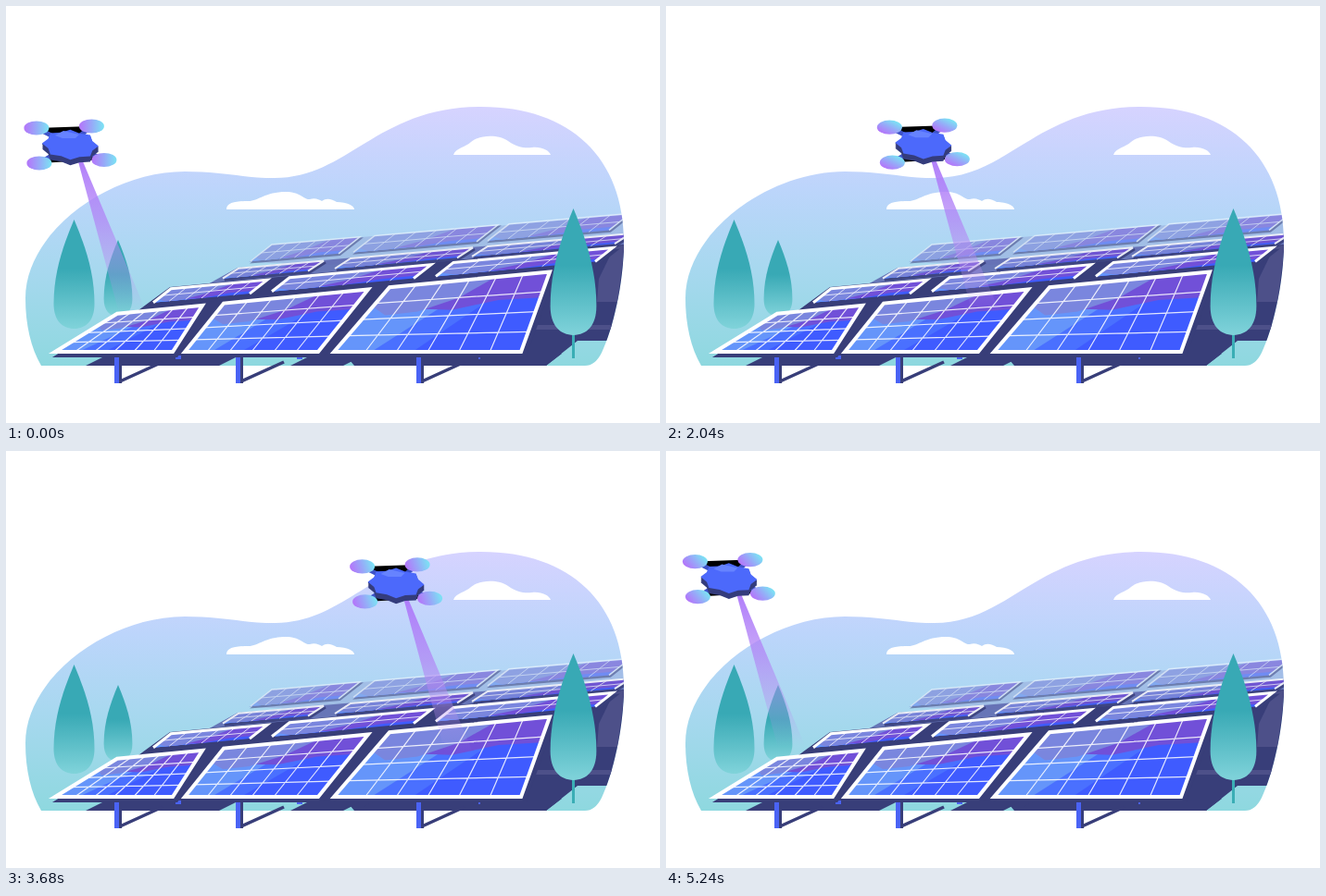
These frames come from a looping animation (706 by 451 pixels, 5.28 s). An HTML page:

```html
<!DOCTYPE html>
<html lang="en">
<head>
<meta charset="utf-8">
<title>Solar field survey</title>
<style>
html, body { margin: 0; width: 100%; height: 100%; overflow: hidden; background: #fff; }
svg { display: block; width: 706px; height: 451px; }
</style>
</head>
<body>
<svg viewBox="0 0 706 451">
  <defs>
    <linearGradient id="sky" x2="0" y2="1">
      <stop stop-color="#d6d3ff"/><stop offset=".32" stop-color="#bcd5fb"/>
      <stop offset=".6" stop-color="#a9d8f0"/><stop offset="1" stop-color="#8ed8df"/>
    </linearGradient>
    <linearGradient id="leaf" x2="0" y2="1">
      <stop offset=".45" stop-color="#38a9b5"/><stop offset="1" stop-color="#80d3da"/>
    </linearGradient>
    <linearGradient id="beam" x2="0" y2="1">
      <stop stop-color="#ad78fa" stop-opacity=".95"/><stop offset=".4" stop-color="#b183f5" stop-opacity=".7"/>
      <stop offset=".7" stop-color="#b58df0" stop-opacity=".4"/><stop offset="1" stop-color="#b79aee" stop-opacity="0"/>
    </linearGradient>
    <linearGradient id="spin">
      <stop offset=".05" stop-color="#b279fa"/><stop offset=".5" stop-color="#97a9f8"/><stop offset=".95" stop-color="#7ddff4"/>
    </linearGradient>
    <path id="blob" d="M38 389C27 370 21 345 21 316C21 245 110 179 193 179C235 179 255 186 290 186C370 186 400 109 513 109C610 109 667 165 667 255C667 300 655 350 643 375Q636 389 625 389Z"/>
    <clipPath id="inBlob"><use href="#blob"/></clipPath>
    <path id="crown" fill="url(#leaf)" d="M0 0C11 26 22 56 22 91C22 109 13 118 0 118C-13 118-22 109-22 91C-22 56-11 26 0 0Z"/>
  </defs>

  <use href="#blob" fill="url(#sky)"/>
  <g fill="#fff">
    <path d="M238 220C238 212 250 211 262 211C272 211 280 201 302 201C318 201 322 210 328 209C333 207 338 209 341 211C346 207 352 209 357 212C368 212 376 216 376 220Z"/>
    <path d="M483 161C486 153 496 153 502 147C512 139 532 139 542 146C552 153 560 154 568 153C578 152 586 156 588 161Z"/>
  </g>
  <use href="#crown" transform="translate(73.500 231)"/>
  <use href="#crown" transform="translate(121 253) scale(.7)"/>

  <g clip-path="url(#inBlob)">
    <path fill="#9aaede" opacity=".6" d="M262 277L287 258L672 226V250L350 280Z"/>
    <g id="row4" opacity=".5"></g>
    <path fill="#5c66ae" opacity=".85" d="M216 302L250 283L672 246V266L285 298Z"/>
    <g id="row3" opacity=".85"></g>
    <path fill="#383e79" d="M143 329L177 304L668 258L665 362H617L583 389H376L366 377H180Z"/>
    <path fill="#4d5089" d="M640 295L656 262L668 258L660 320H638ZM571 345H660L658 350H568Z"/>
    <g id="row2"></g>
    <path fill="#383e79" d="M112 376H256L230 389H86ZM333 376H390L364 389H307ZM405 376H600L583 389H376Z"/>
  </g>

  <g id="legs"></g>
  <path fill="#4a63f5" d="M183 378h6v4h-6zM314 378h6v4h-6zM510 380h2v2h-2z"/>
  <g id="row1"></g>

  <path d="M612.500 350V381" stroke="#3aaeb5" stroke-width="3"/>
  <use href="#crown" transform="translate(612.500 219) scale(1.130 1.160)"/>

  <!-- Drawn around the centre of the upper left rotor -->
  <g id="drone">
    <path fill="url(#beam)" d="M45 36H50L119 200H89Z"/>
    <path stroke="#3d52c8" stroke-width="5" d="M0 0L36 18L59 -2M3 38L36 18L73 34"/>
    <path id="side" fill="#343c7c"/>
    <path id="body" fill="#4c69fb"/>
    <path fill="#6683ff" d="M20 8L29 3L46 7L42 11H28Z"/>
    <g id="rotors" fill="url(#spin)"></g>
  </g>
</svg>
<script>
const LOOP = 5280, SPIN = 528;
const NAVY = '#383e79';
const $ = id => document.getElementById(id);

function add(parent, tag, attrs) {
  const el = document.createElementNS('http://www.w3.org/2000/svg', tag);
  for (const k in attrs) el.setAttribute(k, attrs[k]);
  return parent.appendChild(el);
}

const line = pts => 'M' + pts.map(p => p.map(v => v.toFixed(1))).join('L');
const poly = pts => line(pts) + 'Z';

// Reflections in panel coordinates, (0,0) top left to (1,1) bottom right
const tints = [
  ['#4a70ff', [[.3, .3], [.75, .2], [.42, 1], [0, 1]]],
  ['#6595fa', [[0, .3], [.42, .38], [.2, 1], [0, 1]]],
  ['#7150d8', [[.62, 0], [1, 0], [1, .32], [.75, .32], [.5, .42], [.3, .38]]],
  ['#7a86de', [[0, 0], [.66, 0], [.5, .25], [.3, .42], [.12, .45], [0, .3]]]
];

// shown: how much of the panel's height is visible above the row in front
function panel(g, [tl, tr, br, bl], shown, frame, grid) {
  const at = (u, v) => [0, 1].map(i =>
    (1 - v) * (tl[i] + u * (tr[i] - tl[i])) + v * (bl[i] + u * (br[i] - bl[i])));
  const face = [bl, tl, tr, br], rows = shown < 1 ? 2 : 4;
  add(g, 'path', { d: poly(face.map(([x, y]) => [x + frame, y + frame])), fill: NAVY, stroke: NAVY, 'stroke-width': frame });
  add(g, 'path', { d: poly(face), fill: '#3f5bff' });
  for (const [fill, pts] of tints)
    add(g, 'path', { d: poly(pts.map(([u, v]) => at(u, Math.min(1, v / shown)))), fill });
  let d = '';
  for (let i = 1; i < 6; i++) d += line([at(i / 6, 0), at(i / 6, 1)]);
  for (let i = 1; i < rows; i++) d += line([at(0, i / rows), at(1, i / rows)]);
  add(g, 'path', { d, stroke: '#fff', 'stroke-width': grid, opacity: .85 });
  add(g, 'path', { d: shown < 1 ? line(face) : poly(face), fill: 'none', stroke: '#fff', 'stroke-width': frame });
}

// Three panels whose top edges lie on one sloping line; xs holds their left and right ends
function row(id, xs, y0, slope, foot, shown, frame, grid) {
  const top = x => [x, y0 - slope * x];
  for (let i = 0; i < 6; i += 2) {
    const [l, r] = [xs[i], xs[i + 1]];
    panel($(id), [top(l), top(r), foot(r, i + 1), foot(l, i)], shown, frame, grid);
  }
}

function backRow(id, xs, y0, slope, dx, dy, frame) {
  row(id, xs, y0, slope, x => [x - dx, y0 - slope * x + dy], .4, frame, .9);
}

backRow('row4', [287, 382, 398, 531, 543, 674], 283, .087, 23, 18, 1.5);
backRow('row3', [251, 343, 372, 504, 520, 674], 306, .0887, 17, 11, 2);
backRow('row2', [178, 282, 306, 459, 483, 655], 322.3, .093, 19, 15, 3);
const feet = [53, 180, 193, 337, 354, 556];
row('row1', [120, 212, 235, 391, 414, 587], 344.3, .0968, (x, i) => [feet[i], 374], 1, 4, 1.2);

for (const x of [117, 248, 443]) {
  add($('legs'), 'path', { d: `M${x + 6} 406l46 -21`, stroke: NAVY, 'stroke-width': 3.5 });
  add($('legs'), 'path', { d: `M${x} 376h8v32h-8z`, fill: NAVY });
  add($('legs'), 'path', { d: `M${x} 376h5v32h-5z`, fill: '#4a63f5' });
}

// The drone's hull is a flattened eight-pointed star, extruded downwards
const hull = Array.from({ length: 16 }, (_, i) => {
  const a = i * Math.PI / 8, r = i % 2 ? .89 : 1.05, x = 29 * r * Math.cos(a);
  return [36.5 + x, 18 + 15.5 * r * Math.sin(a) + .05 * x];
});
$('body').setAttribute('d', poly(hull));
$('side').setAttribute('d', [1, 2, 3, 4, 5, 6].map(dy => poly(hull.map(([x, y]) => [x, y + dy]))).join(''));
for (const [cx, cy] of [[0, 0], [59.5, -2], [3, 38], [73, 34.5]])
  add($('rotors'), 'ellipse', { cx, cy, rx: 13.5, ry: 7.6 });

// Steady flight out, faster flight back, blended by a soft minimum
function flyX(t) {
  const out = 33 + .098 * t + 2.1e-6 * t * t, back = 32 + .23 * (5240 - t);
  return (out + back - Math.hypot(out - back, 30)) / 2;
}

// Heights at even intervals, joined by a Catmull-Rom curve
const heights = [132, 118.3, 126, 141, 129, 105.5, 120];
function flyY(t) {
  const p = t / LOOP * (heights.length - 1), i = Math.floor(p), s = p - i;
  const [a, b, c, d] = [-1, 0, 1, 2].map(k => heights[Math.min(Math.max(i + k, 0), heights.length - 1)]);
  return b + s * ((c - a) + s * (2 * a - 5 * b + 4 * c - d + s * (3 * (b - c) + d - a))) / 2;
}

function draw(t) {
  $('drone').setAttribute('transform', `translate(${flyX(t).toFixed(2)} ${flyY(t).toFixed(2)})`);
  $('spin').setAttribute('gradientTransform', `rotate(${(t / SPIN * 360).toFixed(1)} .5 .5)`);
}

const start = performance.now();
function frame() {
  draw((performance.now() - start) % LOOP);
  requestAnimationFrame(frame);
}
frame();
</script>
</body>
</html>
```
